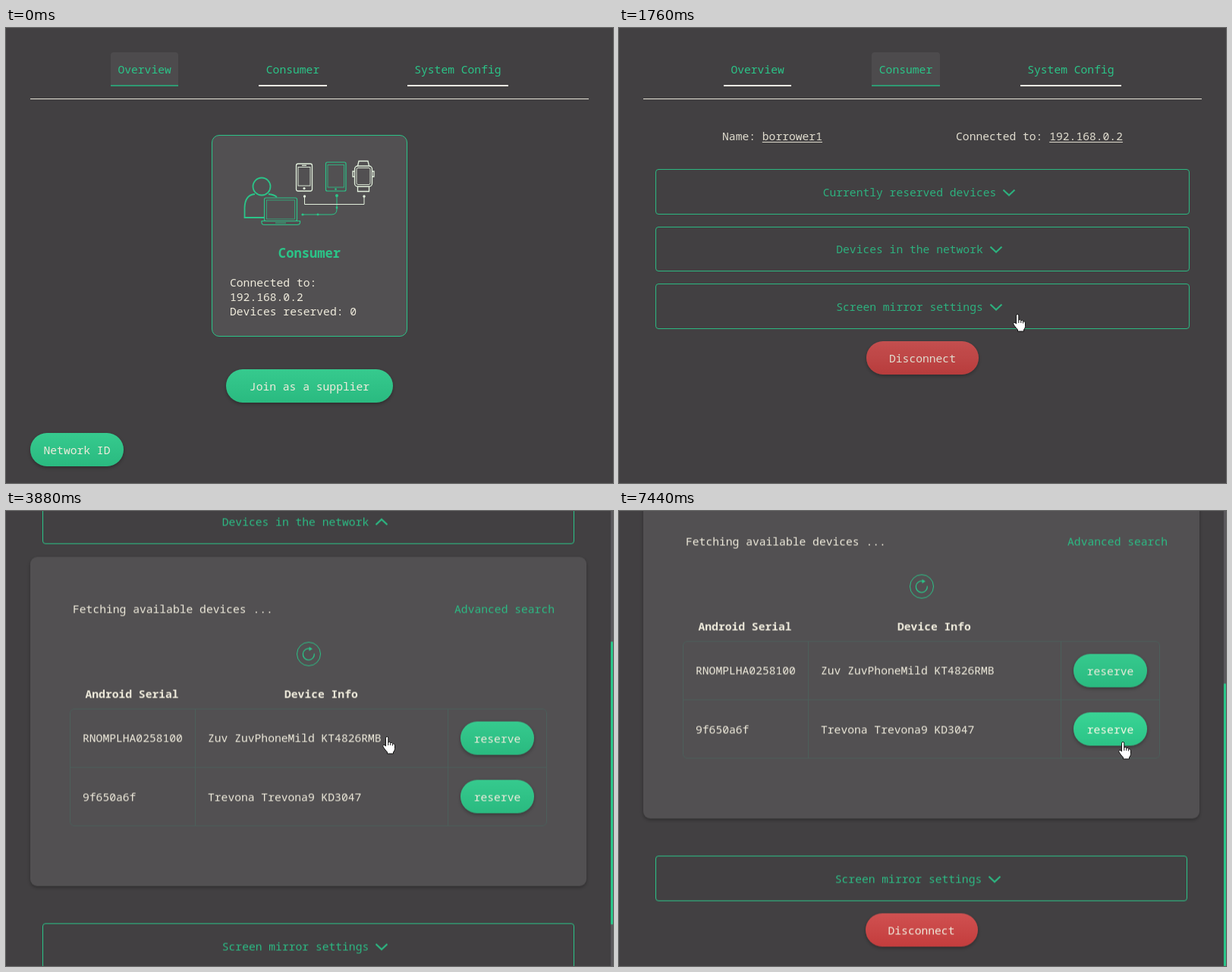
Recreate the animation shown at these times as an HTML page. Size 800 by 600 pixels, loop 8 s.

```html
<!DOCTYPE html>
<html lang="en">
<head>
<meta charset="utf-8">
<title>Device network</title>
<style>
:root { --green: #2bc488; --cream: #efebdc; --panel: #525052; }
* { box-sizing: border-box; }
html, body { margin: 0; width: 100%; height: 100%; overflow: hidden; background: #424042; }
body { font: 500 14.66px/20px 'Noto Sans Mono', monospace; color: var(--cream); white-space: nowrap; }
.stage { position: absolute; left: 0; top: 0; width: 800px; height: 600px; overflow: hidden; }
.stage * { animation-duration: 8s; animation-iteration-count: infinite; animation-timing-function: linear; }
.app, .scroll, .page, .abs { position: absolute; }
.app { left: 0; top: 0; width: 800px; height: 600px; animation-name: app; animation-timing-function: step-end; }
.scroll { inset: 0; animation-name: scroll; }
.page { inset: 0; }
svg { display: block; overflow: visible; fill: none; }

nav { position: absolute; left: 32px; right: 32px; top: 32px; height: 62px; display: flex;
  justify-content: space-evenly; align-items: flex-start; border-bottom: 1px solid #e6e3d8; color: var(--green); }
nav span { height: 45px; line-height: 45px; padding: 0 9.6px; border-bottom: 2px solid #f2eee4; border-radius: 4px 4px 0 0; }
nav .home { animation-name: tabOff; animation-timing-function: step-end; }
nav .use { animation-name: tabOn; animation-timing-function: step-end; }

.btn { position: absolute; height: 44px; line-height: 45px; border-radius: 22px; text-align: center;
  background: linear-gradient(#36ca8e, #2aba80); box-shadow: 0 2px 4px rgba(0,0,0,.3); }
.btn.red { left: 50%; top: 412.5px; width: 148px; margin-left: -74px; background: linear-gradient(#d05151, #c43d3d); }
.reserve { left: 567px; width: 97px; }

.overview { animation-name: leave; }
.card { position: absolute; left: 50%; top: 141px; width: 258px; height: 266px; margin-left: -129px;
  border: 1px solid var(--green); border-radius: 10px; background: var(--panel); animation-name: hover; }
.card svg { position: absolute; left: -1px; top: -1px; }
.card h3 { position: absolute; left: 0; right: 0; top: 145px; margin: 0; font-size: 17.15px; text-align: center; color: var(--green); }
.card p { position: absolute; left: 23px; top: 184px; margin: 0; line-height: 19px; }

.consumer { animation-name: enter; }
.facts { position: absolute; left: 48px; right: 48px; top: 132px; display: flex; justify-content: space-around; }
u { text-underline-offset: 2px; text-decoration-thickness: 1px; }
.fold { position: absolute; left: 48px; right: 48px; height: 59.5px; border: 1px solid var(--green); border-radius: 4px;
  color: #2cbb84; display: flex; justify-content: center; align-items: center; }
.fold svg { width: 16px; height: 8px; margin: 2px 9px 0; stroke: #2cbb84; stroke-width: 2.2; }
.flip { animation-name: flip; animation-timing-function: step-end; }
.lower { inset: 0; animation-name: drop; animation-timing-function: step-end; }

.panel { position: absolute; left: 32px; right: 32px; top: 337.5px; height: 434.5px; border-radius: 9px;
  background: var(--panel); box-shadow: 0 2px 4px rgba(0,0,0,.3); animation-name: show; }
.panel > svg { position: absolute; left: 50%; top: 112px; margin-left: -16px; stroke: var(--green); }
.link { color: #2cbb84; }
.grid { left: 52px; top: 200.5px; width: 629px; height: 155px; border: 1px solid #4c5f5b; border-radius: 6px; }
.grid i { position: absolute; background: #4c5f5b; }
.lit { animation-name: lit; }

.bars { animation-name: bars; animation-timing-function: step-end; }
.vbar { right: 0; top: 0; width: 3px; height: 600px; background: #5b595d; }
.vbar i { position: absolute; left: 0; top: 0; width: 3px; background: var(--green); border-radius: 1px;
  animation-name: size, slide; animation-timing-function: step-end, linear; }
.hbar { left: 0; top: 592px; width: 800px; height: 8px; background: #545257; border-right: 3px solid #eeeeee;
  animation-name: hbar; animation-timing-function: step-end; }
.hbar i { position: absolute; left: 0; top: 0; height: 8px; background: var(--green); border-radius: 4px; animation-name: thumb; }

.cursor { left: 0; top: 0; animation-name: move; }
.cursor svg { position: absolute; fill: #fff; stroke: #111; stroke-width: 1; stroke-linejoin: round; }
.cursor .arrow { left: 0; top: 0; animation-name: arrow; animation-timing-function: step-end; }
.cursor .hand { left: -6px; top: 0; animation-name: hand; animation-timing-function: step-end; }

@keyframes app {
  0%, 15.8%, 18.08%, 100% { width: 800px }
  11.7%, 16.64%, 44.31%, 99.99% { width: 797px }
}
@keyframes bars {
  0%, 15.8%, 18.08% { visibility: hidden }
  11.7%, 16.64%, 44.31%, 100% { visibility: visible }
}
@keyframes hbar {
  0%, 15.8%, 18.08%, 100% { visibility: hidden }
  11.7%, 16.64% { visibility: visible }
}
@keyframes thumb {
  0%, 11.62% { width: 797px; animation-timing-function: ease-in-out }
  15.8%, 16.64% { width: 398px }
  17.62% { width: 617px }
  18.08%, 100% { width: 797px }
}
@keyframes size { 0% { height: 584px } 44.31%, 100% { height: 372.5px } }
@keyframes slide {
  0%, 44.31% { transform: none; animation-timing-function: ease-in-out }
  50.69%, 100% { transform: translateY(227.5px) }
}
@keyframes scroll {
  0%, 44.31% { transform: none; animation-timing-function: ease-in-out }
  50.69%, 100% { transform: translateY(-366.5px) }
}
@keyframes tabOff {
  0% { background: #4d4b4d; border-color: #2f9a73 }
  11.62%, 100% { background: none; border-color: #f2eee4 }
}
@keyframes tabOn {
  0% { background: none; border-color: #f2eee4 }
  11.62%, 100% { background: #4d4b4d; border-color: #2f9a73 }
}
@keyframes hover {
  0%, 6.6% { transform: none; animation-timing-function: ease-out }
  8.2% { transform: scale(1.038) }
  9%, 100% { transform: scale(1.035) }
}
@keyframes leave {
  0%, 11.55% { transform: none; opacity: 1; visibility: visible; animation-timing-function: ease-in-out }
  15.8% { transform: translateX(800px); opacity: 0; visibility: visible }
  15.81%, 100% { transform: translateX(800px); opacity: 0; visibility: hidden }
}
/* underdamped spring: 800 px, then shrinking swings */
@keyframes enter {
  0%, 16.64% { transform: translateX(800px); opacity: 0 }
  17.62% { transform: translateX(231px); opacity: .2 }
  18.08% { transform: none; opacity: .3; animation-timing-function: ease-out }
  18.75% { transform: translateX(-94px); opacity: .45; animation-timing-function: ease-in-out }
  20.87% { transform: translateX(11px); opacity: .82; animation-timing-function: ease-in-out }
  22% { transform: none; opacity: .92; animation-timing-function: ease-out }
  26.8%, 100% { transform: none; opacity: 1 }
}
@keyframes flip { 0% { transform: none } 44.31%, 100% { transform: scaleY(-1) } }
@keyframes drop { 0% { transform: none } 44.31%, 100% { transform: translateY(484px) } }
@keyframes show { 0%, 44.31% { opacity: 0 } 46.5%, 100% { opacity: 1 } }
@keyframes lit { 0%, 84.8% { filter: none } 88.5%, 100% { filter: brightness(1.05) } }
@keyframes move {
  0%, 1.4% { transform: translate(714px, 571px); visibility: hidden }
  1.6% { transform: translate(712px, 569px); visibility: visible }
  6.8% { transform: translate(540px, 396px); animation-timing-function: ease-out }
  9.1%, 22.2% { transform: translate(525px, 377px); animation-timing-function: ease-in-out }
  27.1%, 28.4% { transform: translate(502px, 293px) }
  30.4%, 44.2% { transform: translate(509px, 305px) }
  48.4% { transform: translate(502px, 297px) }
  51.5%, 74% { transform: translate(501px, 297px) }
  76.8%, 80.8% { transform: translate(518px, 297px); animation-timing-function: ease-in-out }
  86.9% { transform: translate(671px, 279px); animation-timing-function: ease-in-out }
  88.7%, 91.8% { transform: translate(653px, 289px) }
  93%, 100% { transform: translate(664px, 304px); visibility: visible }
}
@keyframes arrow { 0%, 15.8%, 51.9% { opacity: 1 } 6.6%, 20.6%, 84.6%, 100% { opacity: 0 } }
@keyframes hand { 0%, 15.8%, 51.9% { opacity: 0 } 6.6%, 20.6%, 84.6%, 100% { opacity: 1 } }
</style>
</head>
<body>
<svg width="0" height="0" style="position:absolute"><symbol id="chev" overflow="visible"><path d="M.5 .5 8 7.5 15.5 .5"/></symbol></svg>
<div class="stage">
  <div class="app">
    <div class="scroll">
      <nav><span class="home">Overview</span><span class="use">Consumer</span><span>System Config</span></nav>

      <div class="page overview">
        <div class="card">
          <svg width="258" height="266" viewBox="271 141 258 266" stroke="#2bc488">
            <g stroke-width="1.8">
              <circle cx="337" cy="209" r="11.5"/>
              <path d="M340 250H314.5V237Q315 220 328 219M346 219Q353 219.5 357 223"/>
            </g>
            <g stroke-width="1.2">
              <rect x="340.5" y="224" width="43" height="30.5" rx="2"/>
              <rect x="343.5" y="227" width="37" height="25" stroke-width=".7"/>
              <path d="M337 254.5H387.5V257Q387 259.5 384 259.5H340Q337.5 259.5 337 257ZM355 257H369"/>
              <rect x="421.5" y="177" width="26.5" height="38" rx="2"/>
              <rect x="424" y="180.5" width="21.5" height="29.5" stroke-width=".8"/>
              <path d="M436 221V239Q436 246 429 246H390" stroke-width="1"/>
            </g>
            <g fill="#2bc488" stroke="none">
              <circle cx="434.5" cy="212.5" r="1.3"/><circle cx="436" cy="221" r="2"/><circle cx="436" cy="237" r="1.4"/>
              <circle cx="411" cy="246" r="1.4"/><circle cx="391" cy="246" r="1.6"/>
            </g>
            <g stroke="#e2efdc" stroke-width="1.3">
              <rect x="382.5" y="179" width="21" height="36" rx="2.5"/>
              <rect x="385" y="183.5" width="16" height="24.5" stroke-width=".9"/>
              <path d="M390 181.3H396"/>
              <rect x="459.5" y="182" width="23" height="27" rx="4"/>
              <rect x="462" y="184.5" width="18" height="22" rx="2" stroke-width=".9"/>
              <path d="M463.5 182 465 175.5H477L478.5 182M463.5 209V215.5H478.5V209M459 189H457V196H459M483 189H485V196H483"/>
              <path d="M393.5 222V232.5H472V222" stroke-width="1"/>
            </g>
            <g fill="#e2efdc" stroke="none">
              <circle cx="393" cy="211.5" r="1.6"/><circle cx="393.5" cy="222" r="1.7"/><circle cx="472" cy="222" r="1.7"/>
            </g>
          </svg>
          <h3>Consumer</h3>
          <p>Connected to:<br>192.168.0.2<br>Devices reserved: 0</p>
        </div>
        <div class="btn" style="left:50%;top:450px;width:220px;margin-left:-110px">Join as a supplier</div>
        <div class="btn" style="left:32px;top:534px;width:123px">Network ID</div>
      </div>

      <div class="page consumer">
        <div class="facts"><span>Name: <u>borrower1</u></span><span>Connected to: <u>192.168.0.2</u></span></div>
        <div class="fold" style="top:186px">Currently reserved devices<svg><use href="#chev"/></svg></div>
        <div class="fold" style="top:261.5px">Devices in the network<svg class="flip"><use href="#chev"/></svg></div>
        <div class="panel">
          <span class="abs" style="left:56px;top:58px">Fetching available devices ...</span>
          <span class="abs link" style="right:42px;top:58px">Advanced search</span>
          <svg width="32" height="32">
            <circle cx="16" cy="16" r="15.5"/>
            <path d="M23.3 15.5A7.5 7.5 0 1 1 18 9.2" stroke-width="1.3"/>
            <path d="M16.5 6.5 21 9.3 16.5 12Z" fill="#2bc488" stroke="none"/>
          </svg>
          <b class="abs" style="left:72.5px;top:170px">Android Serial</b>
          <b class="abs" style="left:335px;top:170px">Device Info</b>
          <div class="abs grid">
            <i style="left:0;top:76px;width:627px;height:1px"></i>
            <i style="left:164px;top:0;width:1px;height:153px"></i>
            <i style="left:497px;top:0;width:1px;height:153px"></i>
          </div>
          <span class="abs" style="left:69px;top:228px">RNOMPLHA0258100</span>
          <span class="abs" style="left:234px;top:228px">Zuv ZuvPhoneMild KT4826RMB</span>
          <span class="abs" style="left:69px;top:306px">9f650a6f</span>
          <span class="abs" style="left:234px;top:306px">Trevona Trevona9 KD3047</span>
          <div class="btn reserve" style="top:217px">reserve</div>
          <div class="btn reserve lit" style="top:294.5px">reserve</div>
        </div>
        <div class="abs lower">
          <div class="fold" style="top:337px">Screen mirror settings<svg><use href="#chev"/></svg></div>
          <div class="btn red">Disconnect</div>
        </div>
      </div>
    </div>
  </div>

  <div class="abs bars vbar"><i></i></div>
  <div class="abs hbar"><i></i></div>

  <div class="abs cursor">
    <svg class="arrow" width="13" height="20"><path d="M.5 .5V16L4 12.7 6.5 18.5 9 17.4 6.5 11.8H11.5Z"/></svg>
    <svg class="hand" width="18" height="24"><path d="M4.5 13V2.2Q4.7 .5 6.2 .5T7.8 2.2V8Q10 6.8 10.8 8.7 13 7.7 13.6 9.7 16.3 9 16.5 12V16.5Q16.4 19 14.5 21V23H6.5V21Q4 18.5 1 14 .2 12 1.8 11.4 3.2 11.3 4.5 13ZM7.8 8V12M10.8 8.7V12M13.6 9.7V12.5"/></svg>
  </div>
</div>
</body>
</html>
```
